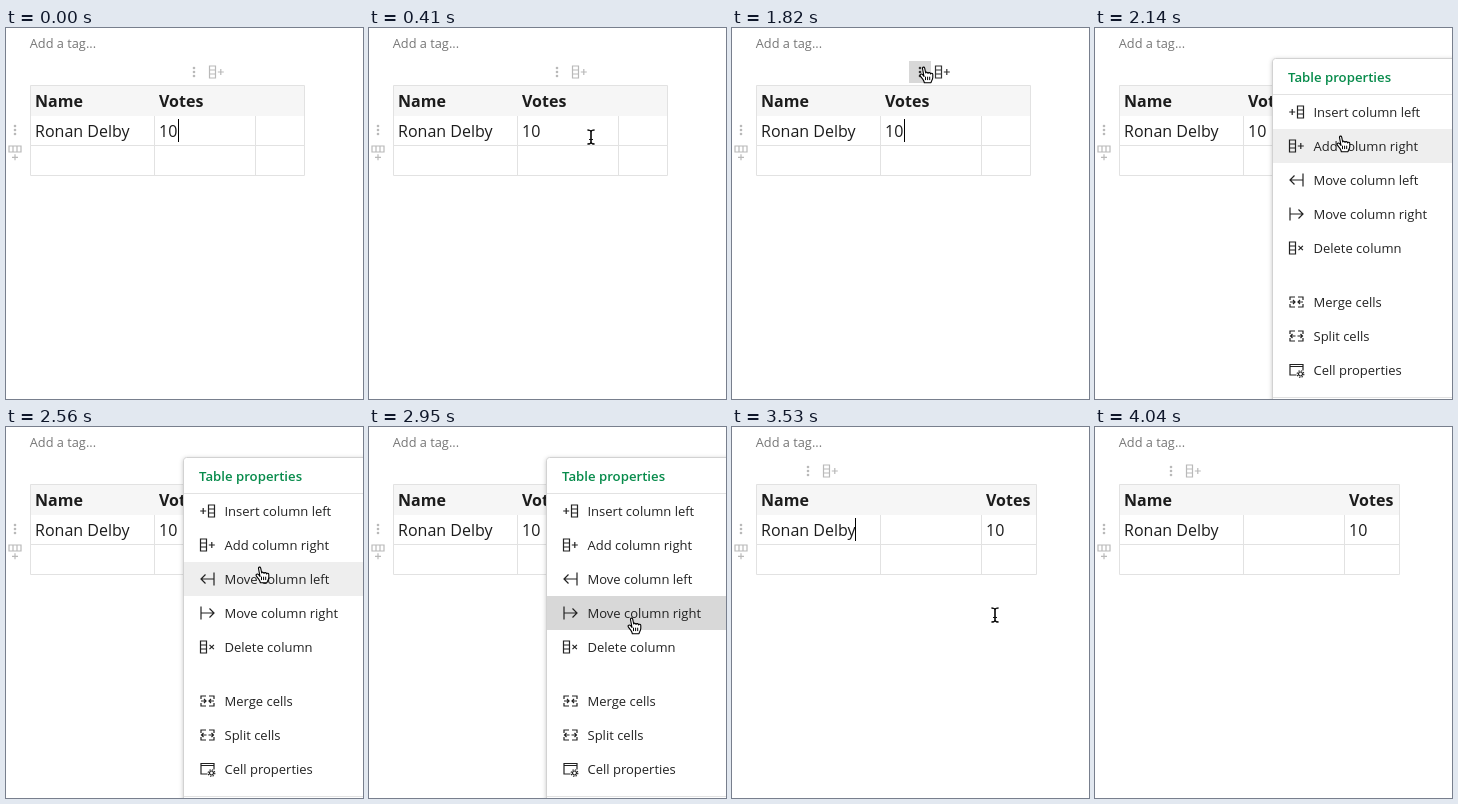
These frames come from a looping animation (357 px wide and 371 px high, 4200 ms). An HTML page:

```html
<!DOCTYPE html>
<html lang="en">
<head>
<meta charset="utf-8">
<title>Moving a table column</title>
<style>
  html, body { margin: 0; width: 100%; height: 100%; overflow: hidden; background: #fff; }
  svg { display: block; width: 100vw; height: 100vh; font-family: "Open Sans", "Noto Sans", sans-serif; }
  .cell { font-size: 16px; fill: #1c1c1c; }
  .head { font-weight: 700; }
  .item { font-size: 13px; fill: #222; }
  .line { fill: none; stroke: #e2e2e2; }
  .icon { fill: none; stroke: currentColor; stroke-width: 1.2; }
  .solid { fill: currentColor; stroke: none; }
  .soft { color: #b9b9b9; }
</style>
</head>
<body>
<svg viewBox="0 0 357 371">
  <defs>
    <filter id="shadow" x="-10%" y="-10%" width="120%" height="120%">
      <feDropShadow dx="0" dy="1" stdDeviation="2" flood-color="#000" flood-opacity=".22"/>
    </filter>
    <g id="dots" class="solid">
      <circle cy="-4" r="1.3"/><circle r="1.3"/><circle cy="4" r="1.3"/>
    </g>
    <path id="column" class="icon" d="M-7-6h6v12h-6zM-7-2h6M-7 2h6"/>
    <g id="addColumn">
      <use href="#column"/>
      <path class="icon" d="M1.3 0h6M4.3-3v6"/>
    </g>
    <g id="deleteColumn">
      <use href="#column"/>
      <path class="icon" d="M2-2.2l4.4 4.4M6.4-2.2L2 2.2"/>
    </g>
    <path id="moveLeft" class="icon" d="M6.5-6.5v13M6.5 0h-13M-2-4.5L-6.5 0-2 4.5"/>
    <path id="mergeCells" class="icon" d="M-1.5-5h-5v3M-6.5 2v3h5M1.5-5h5v3M6.5 2v3h-5M-6.5 0h5M-3.5-2l2 2-2 2M6.5 0h-5M3.5-2l-2 2 2 2"/>
    <path id="splitCells" class="icon" d="M-1.5-5h-5v3M-6.5 2v3h5M1.5-5h5v3M6.5 2v3h-5M-1 0h-5M-4-2l-2 2 2 2M1 0h5M4-2l2 2-2 2"/>
    <g id="cellProperties">
      <path class="icon" d="M0 5h-6.5v-10.5h13v6M-6.5-3.5h13" stroke-width="1.4"/>
      <circle class="icon" cx="4" cy="4" r="2" stroke-width="1.6"/>
      <circle class="icon" cx="4" cy="4" r="3.3" stroke-dasharray="1.3 1.3"/>
    </g>
  </defs>

  <rect width="357" height="371" fill="#fff"/>
  <text x="23.7" y="20" font-size="12.8" fill="#777">Add a tag...</text>

  <rect id="headFill" x="24" y="57" height="31" fill="#f6f6f6"/>
  <path id="grid" class="line"/>
  <text class="cell head" x="29" y="79">Name</text>
  <text class="cell" x="29" y="109">Ronan Delby</text>
  <g id="votes">
    <text class="cell head" y="79">Votes</text>
    <text class="cell" y="109">10</text>
  </g>
  <rect id="caret" y="91" width="1" height="23" fill="#000"/>

  <g class="soft">
    <use href="#dots" x="9" y="102"/>
    <use href="#addColumn" transform="translate(9 125) rotate(90)"/>
  </g>
  <g id="tools">
    <rect id="button" x="-11" y="33" width="22" height="22"/>
    <use href="#dots" y="44"/>
    <use href="#addColumn" x="22.5" y="44"/>
  </g>

  <g id="menu">
    <rect x="177.5" y="30.5" width="200" height="360" rx="3" fill="#fff" stroke="#d2d2d2" filter="url(#shadow)"/>
    <text x="193" y="54" font-size="13.2" font-weight="600" fill="#078b4b">Table properties</text>
    <path class="line" d="M178 66.5H357M178 369.5H357"/>
    <rect id="hover" x="178" width="179" height="34"/>
    <g id="items" color="#222"></g>
  </g>

  <g id="hand" stroke="#000" stroke-linejoin="round">
    <path fill="#fff" stroke-width="1.1" d="M1 9.5L-.4 7.7C-1.6 6.5-3.4 7.2-2.9 8.6-2.2 10-1 11.2 0 12.6.6 13.6 1.2 14.2 1.3 15.7H8C8.2 14.2 9.8 12.6 9.8 10.2V7.6C9.8 6 8 5.8 7.6 7 7.4 5.3 5.4 5.2 5 6.4 4.8 4.9 3 4.8 2.7 6L1.7 1.1C1.3-.5-.8-.1-.5 1.5z"/>
    <path fill="none" d="M2.5 9.7v3.4M4.6 9.7v3.4M6.7 9.7v3.4"/>
  </g>
  <g id="beam" fill="none">
    <path id="beamShape" stroke="#fff" stroke-width="3" d="M-3.5-7Q0-7 0-5 0-7 3.5-7M0-5V5M-3.5 7Q0 7 0 5 0 7 3.5 7M-2 2.5H2"/>
    <use href="#beamLine"/>
    <path id="beamLine" stroke="#111" stroke-width="1.2" d="M-3.5-7Q0-7 0-5 0-7 3.5-7M0-5V5M-3.5 7Q0 7 0 5 0 7 3.5 7M-2 2.5H2"/>
  </g>
</svg>
<script>
const LOOP = 4200, MENU_TOP = 67, ROW = 34;
const MENU_OPEN = 1980, MOVED = 3530;
const $ = id => document.getElementById(id);
const set = (id, attrs) => {
  for (const key in attrs) $(id).setAttribute(key, attrs[key]);
};
const show = (id, on) => set(id, { display: on ? "inline" : "none" });

// Label, icon, extra space above, mirrored icon
const items = [
  ["Insert column left", "addColumn", 0, true],
  ["Add column right", "addColumn", 0],
  ["Move column left", "moveLeft", 0],
  ["Move column right", "moveLeft", 0, true],
  ["Delete column", "deleteColumn", 0],
  ["Merge cells", "mergeCells", 20],
  ["Split cells", "splitCells", 20],
  ["Cell properties", "cellProperties", 20]
];
$("items").innerHTML = items.map(([label, icon, gap, flip], i) => {
  const y = MENU_TOP + ROW * (i + 0.5) + gap;
  return `<use href="#${icon}" transform="translate(201.5 ${y}) scale(${flip ? -1 : 1} 1)"/>` +
    `<text class="item" x="218.5" y="${y + 5}">${label}</text>`;
}).join("");

const bursts = [
  [160, 490, 5], [660, 980, 5], [1320, 1320, 1], [1820, 1820, 1], [1980, 2300, 5],
  [2480, 2950, 7], [3040, 3120, 2], [3370, 3370, 1], [3530, 3530, 1], [3870, 4040, 3]
];
const ticks = [0];
for (const [start, end, n] of bursts) {
  for (let i = 0; i < n; i++) {
    ticks.push(Math.round((start + (end - start) * i / Math.max(1, n - 1)) / 10) * 10);
  }
}
const snap = t => ticks.filter(tick => tick <= t).pop();

// Pointer path: time, x, y
const path = [
  [160, 244, 134], [490, 215, 101], [660, 212, 90], [820, 197, 43], [900, 191, 39],
  [1820, 191, 39], [1980, 200, 56], [2140, 245, 108], [2300, 248, 116], [2480, 250, 122],
  [2800, 263, 194], [2950, 262, 191], [3040, 263, 192], [3120, 263, 191], [3370, 262, 190],
  [3530, 263, 188], [3870, 272, 150], [3950, 286, 24]
];
function pointer(t) {
  const i = path.findIndex(p => p[0] >= t);
  if (i < 1) return path[i < 0 ? path.length - 1 : 0].slice(1);
  const [t0, x0, y0] = path[i - 1], [t1, x1, y1] = path[i];
  const k = (t - t0) / (t1 - t0);
  return [x0 + (x1 - x0) * k, y0 + (y1 - y0) * k];
}

function caretOn(t) {
  if (t < MENU_OPEN) return t < 320 || (t >= 820 && t < 1320) || t >= 1820;
  return t >= MOVED && t < 4040;
}

function drawTable(moved) {
  const right = moved ? 304.5 : 298.5;
  set("headFill", { width: right - 24 });
  set("grid", {
    d: `M24.5 57.5H${right}V147.5H24.5zM24.5 117.5H${right}M148.5 88V147.5M249.5 88V147.5`
  });
  set("votes", { transform: `translate(${moved ? 254 : 153} 0)` });
}

function drawTools(t, moved) {
  const hot = t >= 820 && !moved;
  set("tools", {
    transform: `translate(${moved ? 76 : 188} 0)`,
    color: hot ? "#333" : "#b9b9b9"
  });
  set("button", { fill: !hot ? "none" : t < 900 ? "#eeeeee" : t < 980 ? "#e3e3e3" : "#d8d8d8" });
}

function drawMenu(t, y) {
  const open = t >= MENU_OPEN && t < MOVED;
  const row = Math.floor((y - MENU_TOP) / ROW);
  show("menu", open);
  show("hover", open && row >= 0);
  set("hover", { y: MENU_TOP + row * ROW, fill: t < 2950 ? "#eeeeee" : "#d8d8d8" });
}

function draw(time) {
  const t = snap(time), moved = t >= MOVED;
  const [x, y] = pointer(t);
  const at = { transform: `translate(${Math.round(x)} ${Math.round(y)})` };
  const isHand = t >= 820 && !moved;
  drawTable(moved);
  drawTools(t, moved);
  drawMenu(t, y);
  set("caret", { x: moved ? 123 : 172 });
  show("caret", caretOn(t));
  set("hand", at);
  set("beam", at);
  show("hand", isHand);
  show("beam", !isHand && t >= 160 && t < 4040);
}

const begin = performance.now();
function tick() {
  draw((performance.now() - begin) % LOOP);
  requestAnimationFrame(tick);
}
tick();
</script>
</body>
</html>
```
